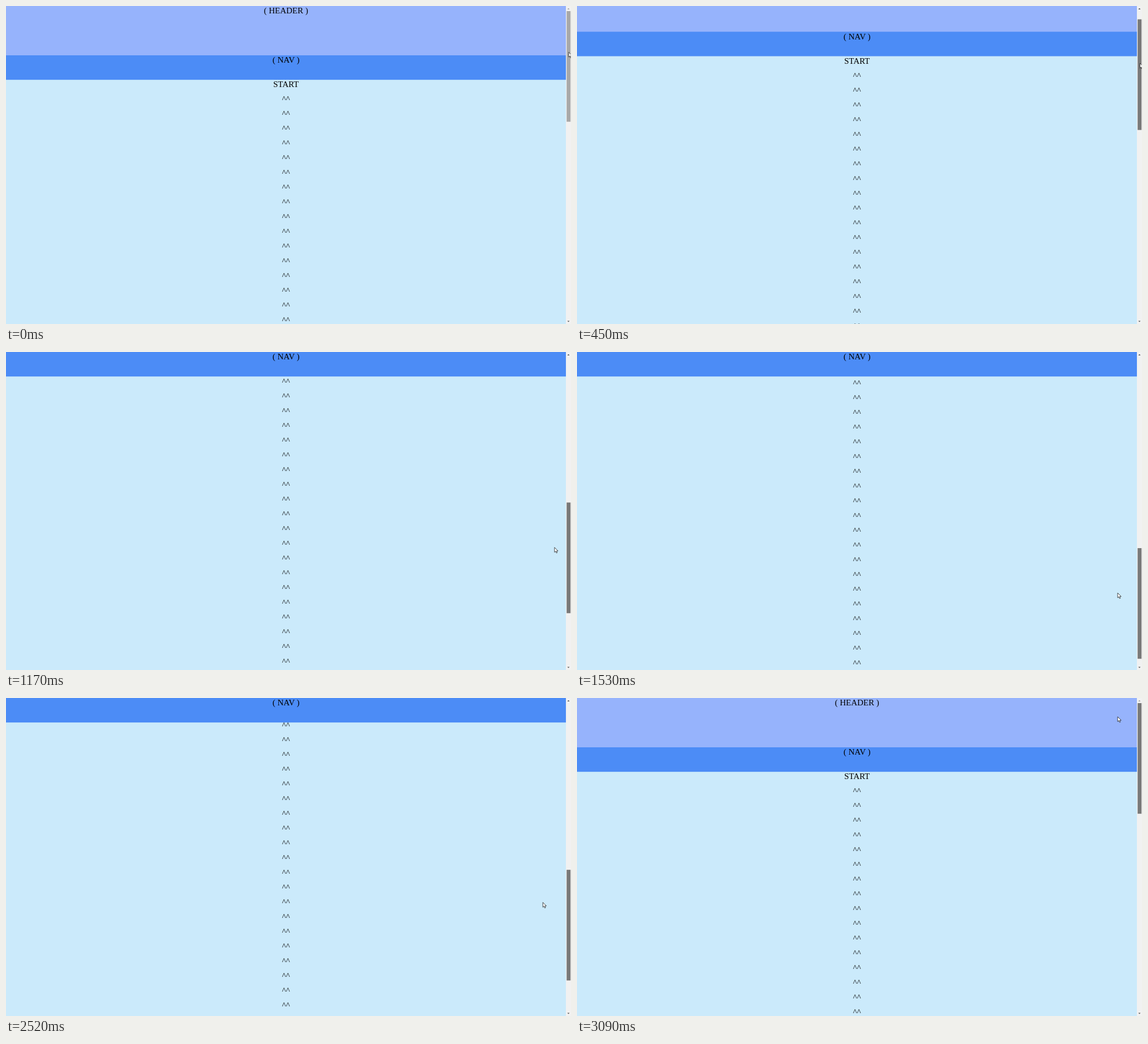
These frames come from a looping animation (998x561 px, 3120 ms). An HTML page:

```html
<!DOCTYPE html>
<html lang="en">
<head>
<meta charset="utf-8">
<title>Sticky nav</title>
<style>
  html, body { margin: 0; width: 100%; height: 100%; overflow: hidden; background: #fcfcfc; }
  svg { display: block; }
  text { font: 14.97px "Liberation Serif", "Times New Roman", serif; text-anchor: middle; }
</style>
</head>
<body>
<svg width="998" height="561" viewBox="0 0 998 561">
  <g id="page">
    <rect width="989.2" height="88" fill="#96b3fc"/>
    <text x="494.6" y="13.4">( HEADER )</text>
    <rect y="130" width="989.2" height="1422.7" fill="#cbeafb" id="main"/>
  </g>
  <g id="nav">
    <rect width="989.2" height="43.2" fill="#4c8cf6"/>
    <text x="494.6" y="13.4">( NAV )</text>
  </g>
  <rect x="989.2" width="8.8" height="561" fill="#f1f1f1"/>
  <path id="up" d="M991.5 6h4l-2-2.2z"/>
  <path id="down" d="M991.5 555.4h4l-2 2.2z"/>
  <rect id="thumb" x="990.3" width="6.8" height="195.2"/>
  <path id="cursor" d="M0 0V8.6L2 6.8 3.4 9.9 4.8 9.3 3.5 6.3H6.2Z" fill="#fff" stroke="#000" stroke-width=".7"/>
</svg>
<script>
const LOOP = 3120, STEP = 30, TRAVEL = 348, MAX_SCROLL = 998.5, HEADER = 87;
const LINES = 55, PITCH = 26;
const $ = id => document.getElementById(id);

for (let i = 0; i < LINES; i++) {
  const line = document.createElementNS($('page').namespaceURI, 'text');
  line.setAttribute('x', 494.6);
  line.setAttribute('y', 143.4 + i * PITCH);
  line.textContent = i === 0 ? 'START' : i === LINES - 1 ? 'END' : '^^';
  $('page').append(line);
}

// Monotone cubic curve through [time, value] points
function curve(points) {
  const slope = i => (points[i + 1][1] - points[i][1]) / (points[i + 1][0] - points[i][0]);
  const tangent = i => {
    if (i === 0) return slope(0);
    if (i === points.length - 1) return slope(i - 1);
    const a = slope(i - 1), b = slope(i);
    return a * b > 0 ? 2 * a * b / (a + b) : 0;
  };
  return t => {
    let i = 0;
    while (i < points.length - 2 && t > points[i + 1][0]) i++;
    const [t0, v0] = points[i], [t1, v1] = points[i + 1];
    const d = t1 - t0, u = Math.min(1, (t - t0) / d), w = 1 - u;
    return w * w * (1 + 2 * u) * v0 + u * u * (3 - 2 * u) * v1
      + d * u * w * (w * tangent(i) - u * tangent(i + 1));
  };
}

const cursorX = curve([[0, 994], [450, 994.5], [780, 987], [1530, 955], [1950, 951],
  [2220, 951], [2790, 946], [3090, 955]]);
const cursorY = curve([[0, 81.5], [210, 87], [300, 88.5], [450, 101], [540, 121], [780, 226],
  [1530, 425], [1950, 477], [2220, 477], [2250, 476], [2370, 445], [2560, 335],
  [2790, 184], [3000, 76], [3090, 33]]);
const thumbY = curve([[0, 0], [270, 0], [450, 14.5], [540, 36], [780, 138], [1530, 337],
  [1620, TRAVEL], [2400, TRAVEL], [2570, 262], [2790, 119], [3000, 0], [3090, 0]]);

const move = (id, x, y) => $(id).setAttribute('transform', `translate(${x} ${y})`);
const fill = (id, color) => $(id).setAttribute('fill', color);

function draw(now) {
  const t = Math.floor((now % LOOP) / STEP) * STEP;
  const offset = thumbY(t), scroll = offset / TRAVEL * MAX_SCROLL;
  move('page', 0, -scroll);
  move('nav', 0, Math.max(0, HEADER - scroll));
  move('thumb', 0, 9 + offset);
  move('cursor', cursorX(t), cursorY(t));
  fill('thumb', t < 240 ? '#a8a8a8' : '#787878');
  fill('up', offset < 0.1 ? '#a3a3a3' : '#505050');
  fill('down', offset > TRAVEL - 0.1 ? '#a3a3a3' : '#505050');
}

const start = performance.now();
function tick() {
  draw(performance.now() - start);
  requestAnimationFrame(tick);
}
tick();
</script>
</body>
</html>
```
